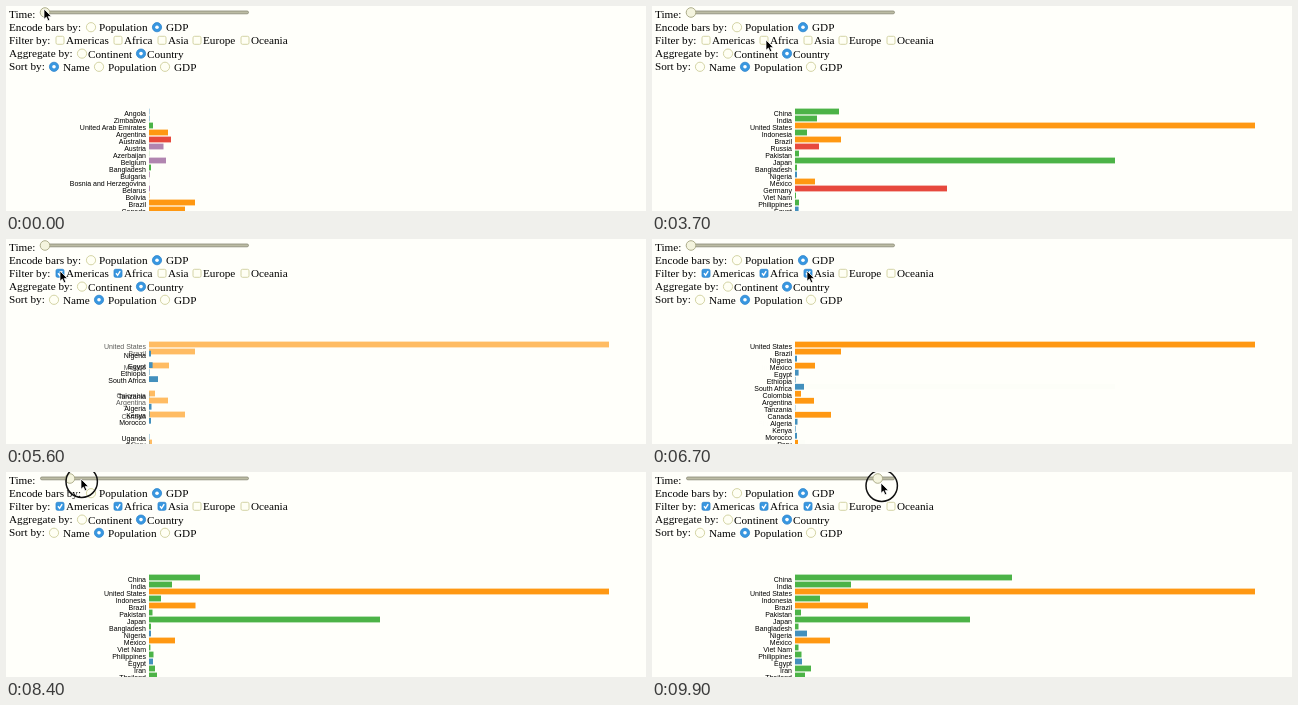
These frames come from a looping animation (640x205 px, 10 s). An HTML page:

```html
<!DOCTYPE html>
<html lang="en">
<head>
<meta charset="utf-8">
<title>Country bars</title>
<style>
html, body { margin: 0; width: 100%; height: 100%; overflow: hidden; background: #fffffa; }
svg { display: block; }
.ui { font: 11.2px "Liberation Serif", Times, serif; }
.row { font: 7px "Liberation Sans", Arial, sans-serif; text-anchor: end; }
.off { fill: #fffff4; stroke: #d0d09c; stroke-width: .9; }
.on { fill: #3897e0; stroke: #2f86cd; stroke-width: .8; }
.mark { fill: #fff; }
.tick { fill: none; stroke: #fff; stroke-width: 1.4; }
</style>
</head>
<body>
<svg id="stage" width="640" height="205" viewBox="0 0 640 205"></svg>
<script>
const LOOP = 10000, STEP = 100, MOVE = 540;

// By population: code, continent, name, then bar widths for the first, third and last years
const countries = `CHN As China 44 51 217
IND As India 22 23 56
USA Am United_States 460
IDN As Indonesia 12 12 25
BRA Am Brazil 46 46.5 73
RUS Eu Russia 24
PAK As Pakistan 4 3.5 6
JPN As Japan 320 231 175
BGD As Bangladesh 2 2 3.5
NGA Af Nigeria 2 2 12
MEX Am Mexico 20 26 35
DEU Eu Germany 152
VNM As Viet_Nam 1 1.4 3.5
PHL As Philippines 4 4.5 6.5
EGY Af Egypt 3.6 4 7
IRN As Iran 5 6 16
TUR Eu Turkey 10
THA As Thailand 10 8 10
FRA Eu France 96
GBR Eu United_Kingdom 74
ETH Af Ethiopia .5
ITA Eu Italy 70
UKR Eu Ukraine 3
KOR As South_Korea 33
ZAF Af South_Africa 9
ESP Eu Spain 37
POL Eu Poland 8
COL Am Colombia 6
ARG Am Argentina 19
TZA Af Tanzania .3
CAN Am Canada 36
DZA Af Algeria 2.5
KEN Af Kenya .6
MAR Af Morocco 2
PER Am Peru 3
ROU Eu Romania 2
UZB As Uzbekistan 1
VEN Am Venezuela 5
UGA Af Uganda .4
MYS As Malaysia 5
NPL As Nepal .3
AUS Oc Australia 22
IRQ As Iraq 1
SAU As Saudi_Arabia 9
LKA As Sri_Lanka 1
GHA Af Ghana .4
MOZ Af Mozambique .2
NLD Eu Netherlands 25
KAZ As Kazakhstan 1
CIV Af Cote_d'Ivoire .7
CMR Af Cameroon .6
MDG Af Madagascar .2
AGO Af Angola .4
AGZ Af Zimbabwe .5
CHL Am Chile 4
SYR As Syria .8
CUB Am Cuba 2
ECU Am Ecuador 1
GRC Eu Greece 8
CZE Eu Czech_Republic 3
HUN Eu Hungary 3
BLR Eu Belarus .9
BEL Eu Belgium 17
PRT Eu Portugal 7
GTM Am Guatemala .9
MWI Af Malawi .1
MLI Af Mali .2
NER Af Niger .1
TUN Af Tunisia 1
SWE Eu Sweden 15
SEN Af Senegal .3
BGR Eu Bulgaria .8
AUT Eu Austria 14.5
DOM Am Dominican_Republic 1
AZE As Azerbaijan .2
BOL Am Bolivia .4
CHE Eu Switzerland 19
ZMB Af Zambia .2
RWA Af Rwanda .1
HTI Am Haiti .2
TCD Af Chad .1
SLV Am El_Salvador .6
HND Am Honduras .2
TJK As Tajikistan .1
ISR As Israel 6
PRY Am Paraguay .5
LAO As Laos .1
SVK Eu Slovakia 1
NIC Am Nicaragua .2
DNK Eu Denmark 11
FIN Eu Finland 8
NOR Eu Norway 9
NZL Oc New_Zealand 4
BIH Eu Bosnia_and_Herzegovina .1
ARE As United_Arab_Emirates 4`.split("\n").map(line => {
  const [code, cont, name, ...w] = line.split(" ");
  return { code, cont, name: name.replace(/_/g, " "), w: w.map(Number) };
});

const only = (...conts) => countries.filter(c => conts.includes(c.cont));
const views = [
  { at: 0, list: [...countries].sort((a, b) => a.code < b.code ? -1 : 1) },
  { at: 1715, list: countries },
  { at: 4010, list: only("Af") },
  { at: 5300, list: only("Af", "Am") },
  { at: 6650, list: only("Af", "Am", "As") }
];
const colors = { Af: "#4390bd", As: "#4cb347", Am: "#ff9812", Eu: "#e7493d", Oc: "#b185b0" };

// Pointer stops: time, x, y
const path = [[0, 38, 3], [1200, 95, 60], [2800, 95, 60], [3700, 114, 34], [4500, 114, 34],
  [5000, 54, 32], [5700, 54, 32], [6400, 155, 32], [6900, 155, 32], [7750, 39, 4],
  [8050, 39, 5], [8400, 75, 7], [9900, 229, 11], [LOOP, 229, 11]];
const PRESS = 7800, DRAG = 8050;

const stage = document.getElementById("stage");
const clamp = v => Math.max(0, Math.min(1, v));
const mix = (a, b, p) => a + (b - a) * p;
const ease = p => p < .5 ? 4 * p ** 3 : 1 - 4 * (1 - p) ** 3;

function add(parent, tag, attrs, text) {
  const el = document.createElementNS("http://www.w3.org/2000/svg", tag);
  for (const key in attrs) el.setAttribute(key, attrs[key]);
  if (text) el.textContent = text;
  parent.append(el);
  return el;
}
const show = (el, on) => el.setAttribute("visibility", on ? "visible" : "hidden");

// Chart rows
for (const c of countries) {
  c.rows = views.map(v => v.list.indexOf(c));
  c.g = add(stage, "g", { class: "row" });
  c.bar = add(c.g, "rect", { x: 143, y: 102.6, height: 5.8 });
  add(c.g, "text", { x: 140, y: 109.5 }, c.name);
}

// Controls
const ui = add(stage, "g", { class: "ui" });
const label = (x, y, text) => add(ui, "text", { x, y: y + 4 }, text);

function radio(x, y, text, tx) {
  label(tx, y, text);
  const dot = add(ui, "circle", { cx: x, cy: y, r: 4.6 });
  const mark = add(ui, "circle", { cx: x, cy: y, r: 1.8, class: "mark" });
  return on => {
    dot.setAttribute("class", on ? "on" : "off");
    show(mark, on);
  };
}
function check(x, y, text) {
  label(x + 6, y, text);
  const box = add(ui, "rect", { x: x - 4, y: y - 4, width: 8, height: 8, rx: 1.5 });
  const tick = add(ui, "path", { d: `M${x - 2} ${y}l1.6 2 2.6-4.2`, class: "tick" });
  return on => {
    box.setAttribute("class", on ? "on" : "off");
    show(tick, on);
  };
}

["Time:", "Encode bars by:", "Filter by:", "Aggregate by:", "Sort by:"]
  .forEach((text, i) => label(3, 8 + 13.1 * i, text));
radio(85, 21.2, "Population", 93)(false);
radio(151, 21.2, "GDP", 160)(true);
const americas = check(54, 34.3, "Americas");
const africa = check(112, 34.3, "Africa");
const asia = check(156, 34.3, "Asia");
check(191, 34.3, "Europe")(false);
check(239, 34.3, "Oceania")(false);
radio(76, 47.6, "Continent", 82)(false);
radio(135, 47.6, "Country", 141)(true);
const byName = radio(48, 60.8, "Name", 57);
const byPop = radio(93, 60.8, "Population", 102);
radio(159, 60.8, "GDP", 168)(false);

add(ui, "rect", { x: 34.5, y: 5, width: 208, height: 2.8, rx: 1.4, fill: "#bcbca4", stroke: "#888874", "stroke-width": .8 });
const thumb = add(ui, "circle", { cy: 6.5, r: 4.8, fill: "#f4f4de", stroke: "#a8a884", "stroke-width": .9 });

const ring = add(stage, "circle", { r: 15.7, fill: "none", stroke: "#111", "stroke-width": 1.5 });
const pointer = add(stage, "path", {
  d: "M0 0V10.2L2.4 8 4 11.8 5.8 11 4.2 7.4H7.4Z", fill: "#000", stroke: "#fff", "stroke-width": .7
});

function pointerAt(t) {
  const i = path.findIndex(p => p[0] > t);
  const [t0, x0, y0] = path[i - 1], [t1, x1, y1] = path[i];
  let p = (t - t0) / (t1 - t0);
  if (t < DRAG) p = p * p * (3 - 2 * p);
  return [mix(x0, x1, p), mix(y0, y1, p)];
}

function widthAt([a, b = a, c = b], x) {
  if (x < 75) return mix(a, b, clamp((x - 39) / 36));
  const p = clamp((x - 75) / 154);
  return b * (c / b) ** (c > b ? p * p : p);
}

function draw(time) {
  const t = Math.floor(time % LOOP / STEP) * STEP;
  const [x, y] = pointerAt(t);
  const now = views.filter(v => v.at <= t).length - 1;
  const prev = Math.max(0, now - 1);
  const p = ease(clamp((t - views[now].at) / MOVE));
  const dragX = t < DRAG ? 39 : x;

  for (const c of countries) {
    const a = c.rows[prev], b = c.rows[now];
    const row = a < 0 ? b : b < 0 ? a : mix(a, b, p);
    const alpha = mix(a < 0 ? 0 : 1, b < 0 ? 0 : 1, p);
    show(c.g, alpha > 0 && row < 15);
    c.g.setAttribute("opacity", alpha);
    c.g.setAttribute("transform", `translate(0 ${row * 7})`);
    c.bar.setAttribute("width", widthAt(c.w, dragX));
    // Europe and Oceania trade colours once the rows are re-sorted
    const key = now ? c.cont : { Eu: "Oc", Oc: "Eu" }[c.cont] || c.cont;
    c.bar.setAttribute("fill", colors[key]);
  }

  byName(now < 1);
  byPop(now > 0);
  africa(now > 1);
  americas(now > 2);
  asia(now > 3);
  thumb.setAttribute("cx", 39 + 12.45 * Math.floor((dragX - 39) / 12.45));
  show(ring, t >= PRESS);
  ring.setAttribute("cx", x + .7);
  ring.setAttribute("cy", y + 2.8);
  pointer.setAttribute("transform", `translate(${x} ${y})`);
}

const start = performance.now();
function frame() {
  draw(performance.now() - start);
  requestAnimationFrame(frame);
}
frame();
</script>
</body>
</html>
```
